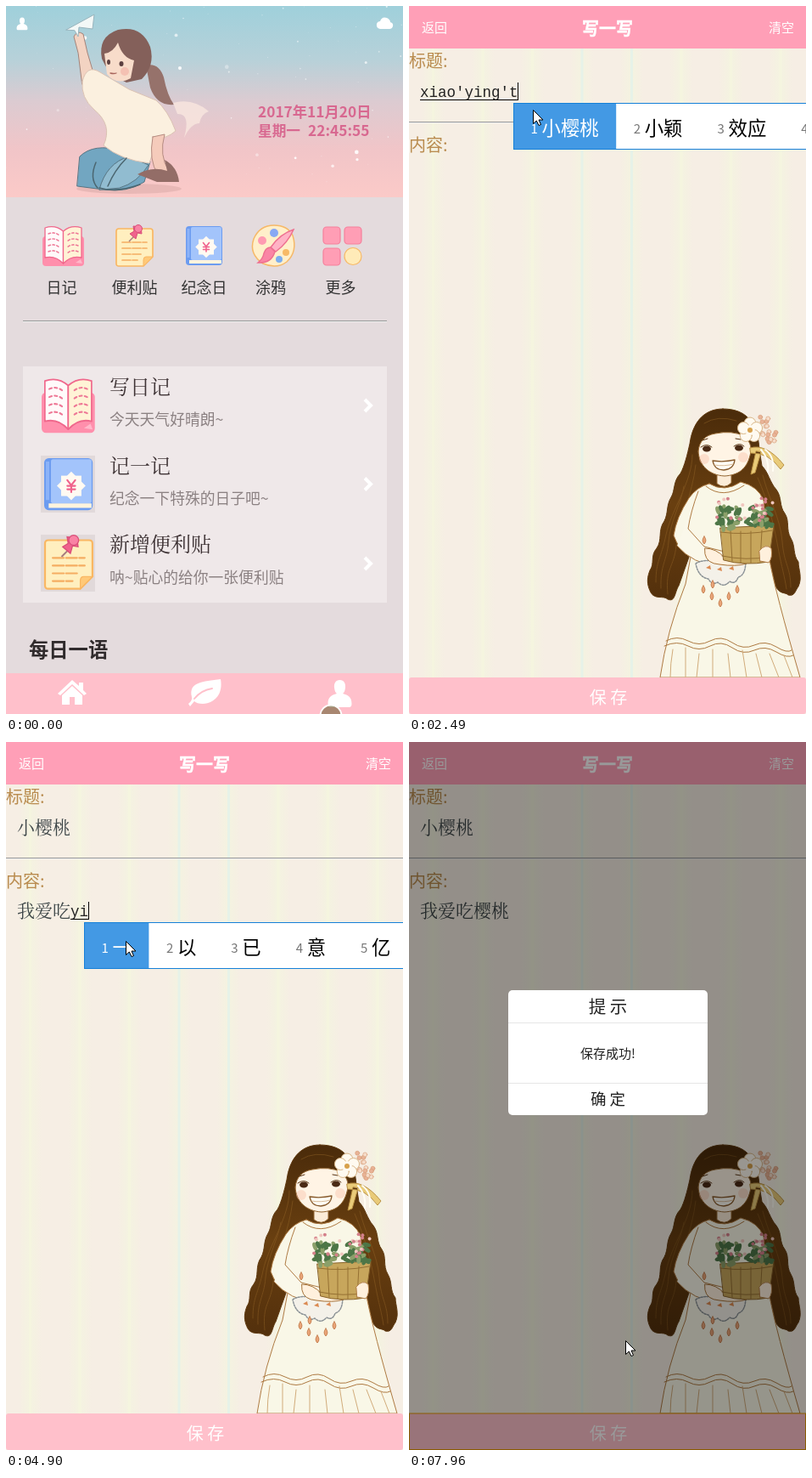
Write an HTML page that moves like this. It is 468 by 833 pixels and loops after 8 s.

```html
<!DOCTYPE html>
<html lang="zh-CN">
<head>
<meta charset="utf-8">
<title>写一写</title>
<style>
html, body { margin: 0; width: 100%; height: 100%; overflow: hidden; }
svg { display: block; width: 100vw; height: 100vh; }
text { font-family: "Noto Sans CJK SC", "Noto Sans", sans-serif; white-space: pre; }
.mid { text-anchor: middle; }
.serif { font-family: "Noto Serif CJK SC", "Noto Sans CJK SC", serif; }
.label { font-size: 18px; fill: #333; text-anchor: middle; }
.row { font-size: 24px; font-weight: 500; fill: #3f3436; }
.note { font-size: 17.8px; fill: #8b8182; }
.typed { font-size: 21px; font-weight: 300; fill: #3d4648; }
.pinyin { font: 17.5px "Liberation Mono", monospace; fill: #222; }
.line { fill: none; stroke-linecap: round; stroke-linejoin: round; }
</style>
</head>
<body>
<svg viewBox="0 0 468 833" preserveAspectRatio="none">
<defs>
  <linearGradient id="sky" x1="0" y1="0" x2="0" y2="1">
    <stop offset="0" stop-color="#9fd0db"/><stop offset=".28" stop-color="#b7d1d9"/>
    <stop offset=".5" stop-color="#dccbd1"/><stop offset=".75" stop-color="#f1c5c8"/>
    <stop offset="1" stop-color="#fbcac8"/>
  </linearGradient>
  <linearGradient id="hair" x1="0" y1="0" x2="0" y2="1">
    <stop offset="0" stop-color="#4a2b0a"/><stop offset=".5" stop-color="#693f10"/><stop offset="1" stop-color="#53300c"/>
  </linearGradient>
  <linearGradient id="stripe">
    <stop offset="0" stop-color="#f4f3e0" stop-opacity="0"/><stop offset=".5" stop-color="#f4f3e0"/>
    <stop offset="1" stop-color="#f4f3e0" stop-opacity="0"/>
  </linearGradient>
  <g id="diary">
    <rect y="13" width="49" height="35" rx="4" fill="#ff8fac"/>
    <g stroke="#f0688c" stroke-width="1.300" stroke-linejoin="round">
      <path d="M3 3Q15-1 24.500 7V45Q15 35 3 38Z" fill="#fffafa"/>
      <path d="M46 3Q34-1 24.500 7V45Q34 35 46 38Z" fill="#fff3d6"/>
    </g>
    <path class="line" d="M7 10Q14 7 20 12M7 17Q14 14 20 19M7 24Q14 21 20 26M7 31Q14 28 20 33M42 10Q35 7 29 12M42 17Q35 14 29 19M42 24Q35 21 29 26M42 31Q35 28 29 33" stroke="#ee7896" stroke-width="1.500" stroke-dasharray="2.500 2.500"/>
    <path d="M39 44l6-4 2 5z" fill="#ffb8ca"/>
  </g>
  <g id="memo">
    <path d="M3 5H40Q43 5 43 8V38L32 49H3Q0 49 0 46V8Q0 5 3 5Z" fill="#ffefbf" stroke="#f9b763" stroke-width="1.700"/>
    <path d="M43 38H35Q32 38 32 42V49Z" fill="#ffc978" stroke="#f9b763"/>
    <path class="line" d="M7 21H36M7 28H36M7 35H31M7 42H25" stroke="#f5ad62" stroke-width="1.700" stroke-dasharray="10 2"/>
    <path d="M22 13L15 20" stroke="#a67b7d" stroke-width="1.500"/>
    <path d="M20 2l9 1 1 8-5-1-2 7-7-6 5-3z" fill="#f0628c" stroke="#d94e79"/>
    <circle cx="26" cy="5" r="4.500" fill="#f982a4" stroke="#d94e79"/>
  </g>
  <g id="book">
    <rect width="43" height="46" rx="4" fill="#6c9cf0"/>
    <rect x="6" y="1" width="36" height="39" rx="2" fill="#a3c4fb"/>
    <path d="M4 40H42V44H4Z" fill="#fff4dd"/>
    <path d="M3 3V37" stroke="#8cb3f8" stroke-width="3"/>
    <g fill="#fffaf2"><rect x="15" y="15.500" width="18" height="18"/><rect x="15" y="15.500" width="18" height="18" transform="rotate(45 24 24.500)"/></g>
    <path class="line" d="M20.500 19.500L24 24L27.500 19.500M24 24V30M20.500 24.500H27.500M20.500 27.500H27.500" stroke="#f0628c" stroke-width="1.600"/>
  </g>
  <path id="user" d="M0-14C5-14 7-10 6.500-5C6-1 5 1 3.500 2C10 4 14 6 14 14Q14 18 11 18H-11Q-14 18-14 14C-14 6-10 4-3.500 2C-5 1-6-1-6.500-5C-7-10-5-14 0-14Z" fill="#fff"/>
</defs>

<g id="home">
  <rect width="468" height="833" fill="#e4dbdd"/>
  <rect width="468" height="225" fill="url(#sky)"/>
  <g id="sparks" fill="#fff"></g>
  <g stroke-linejoin="round" stroke-linecap="round">
    <ellipse cx="145" cy="215" rx="62" ry="6" fill="#d7a7a6" opacity=".5"/>
    <path d="M165 70Q180 66 186 84Q190 105 198 116Q178 118 170 96Z" fill="#96726b"/>
    <path d="M85 55L80 36Q84 28 91 33L96 55L104 82L90 92Z" fill="#f3d3c2" stroke="#a48379"/>
    <path d="M71 28L104 10L102 27L86 25L85 36L81 29Z" fill="#f3f8f7" stroke="#98b4bd"/>
    <path d="M113 62Q108 36 132 28Q160 22 170 48Q176 70 160 86L142 90Q124 82 117 70Z" fill="#84605a"/>
    <path d="M116 56Q126 55 132 43Q137 61 151 64L147 85Q130 94 119 80Z" fill="#f8dcca"/>
    <g fill="#5c4040"><ellipse cx="121" cy="66" rx="2" ry="3"/><ellipse cx="136" cy="68" rx="2.500" ry="3"/></g>
    <path d="M123 79q4 1 7 0" fill="none" stroke="#a8655c" stroke-width="1.300"/>
    <circle cx="140" cy="77" r="5" fill="#f2afa3" opacity=".6"/>
    <path d="M87 177Q103 161 136 170L170 183L163 207Q143 220 115 216L84 212Z" fill="#72a6c1" stroke="#577583"/>
    <path d="M110 216Q118 185 145 177L168 187Q155 208 134 214Z" fill="#91bcd0" stroke="#577583"/>
    <path d="M90 89Q95 68 111 78L145 98L177 111Q191 123 200 147Q188 157 179 154L169 185Q135 181 115 164Q126 140 104 122Q88 108 90 89Z" fill="#fbf0df" stroke="#dbc3b4"/>
    <path d="M173 154L187 151Q180 176 192 194L179 198Q168 182 173 154Z" fill="#f5cbbb" stroke="#b58b80"/>
    <path d="M155 198Q172 188 190 194L187 181Q202 189 204 207H178Z" fill="#936d67"/>
    <path d="M110 214Q130 220 158 210M106 184Q98 203 108 214M142 179Q128 193 120 212" fill="none" stroke="#4b6670" stroke-width="1.500"/>
    <path d="M197 114Q220 108 239 124Q230 127 228 138Q218 138 210 155Q218 126 202 127Z" fill="#f8e6df" opacity=".85"/>
  </g>
  <use href="#user" transform="translate(19 20) scale(.46)"/>
  <path d="M441 27Q436 26 437 21Q438 18 441 18Q443 12 449 14Q453 16 453 19Q457 20 456 24Q455 27 452 27Z" fill="#fff"/>
  <g font-size="17.300" font-weight="700" fill="#d86890">
    <text x="297" y="131">2017年11月20日</text>
    <text x="297" y="153" font-size="16.700">星期一</text>
    <text x="356" y="153" id="clock"></text>
  </g>
  <use href="#diary" x="43" y="258"/><use href="#memo" x="130" y="257"/><use href="#book" x="212" y="259"/>
  <g stroke-width="1.500">
    <path d="M338 270Q344 289 331 301Q319 310 303 303Q286 292 292 274Q299 258 316 258Q332 258 338 270Z" fill="#ffefca" stroke="#f6b968"/>
    <circle cx="302" cy="276" r="5" fill="#ff9bb2"/><circle cx="316" cy="267" r="5" fill="#88a8f4"/>
    <circle cx="330" cy="290" r="4" fill="#f7ba66"/><circle cx="322" cy="298" r="4" fill="#7cadee"/>
    <path d="M339 263Q332 279 318 289L312 284Q323 268 339 263Z" fill="#ffb2c5" stroke="#ee7090"/>
    <path d="M317 289Q313 303 297 302Q303 297 304 291Q306 284 312 284Z" fill="#fa85a5" stroke="#ee7090"/>
  </g>
  <g fill="#ff9eb5" stroke="#f5809c" stroke-width="1.200">
    <rect x="374" y="260" width="20" height="20" rx="4"/><rect x="399" y="260" width="20" height="20" rx="4"/>
    <rect x="374" y="285" width="20" height="20" rx="4"/>
    <circle cx="409" cy="294.500" r="10" fill="#ffebb8" stroke="#f7b967"/>
  </g>
  <text class="label" x="65.500" y="338">日记</text><text class="label" x="151.500" y="338">便利贴</text>
  <text class="label" x="233.500" y="338">纪念日</text><text class="label" x="312" y="338">涂鸦</text>
  <text class="label" x="394.500" y="338">更多</text>
  <path d="M20 370.500H449" stroke="#999"/><path d="M20 371.500H449" stroke="#eee"/>
  <rect x="20" y="424" width="429" height="278" fill="#efe8e9"/>
  <path d="M41 529h64v67h-64zM41 622h64v67h-64z" fill="#e1d9da"/>
  <use href="#diary" transform="translate(42 437) scale(1.280 1.360)"/>
  <use href="#book" transform="translate(45 532) scale(1.330)"/>
  <use href="#memo" transform="translate(46 622) scale(1.300)"/>
  <text class="row serif" x="122" y="457">写日记</text><text class="note" x="122" y="493">今天天气好晴朗~</text>
  <text class="row serif" x="122" y="550">记一记</text><text class="note" x="122" y="586">纪念一下特殊的日子吧~</text>
  <text class="row serif" x="122" y="642">新增便利贴</text><text class="note" x="122" y="679">呐~贴心的给你一张便利贴</text>
  <path d="M423 463l7 7-7 7M423 555.500l7 7-7 7M423 649l7 7-7 7" fill="none" stroke="#fff" stroke-width="4"/>
  <text x="27" y="766" font-size="23.300" font-weight="700" fill="#302b2c">每日一语</text>
  <rect y="785" width="468" height="48" fill="#ffc0cb"/>
  <path d="M61 809L78 793L86 800V796H91V805L95 809L92 811L78 798L64 811ZM66 811L78 800L90 811V822H81V813H75V822H66Z" fill="#fff"/>
  <path d="M215 821Q220 817 219 813C215 795 232 795 253 792C256 809 247 820 232 821Q225 821 222 818L217 824Z" fill="#fff"/>
  <path class="line" d="M222 815Q230 805 243 803" stroke="#ffc0cb" stroke-width="2"/>
  <use href="#user" x="393.500" y="807"/>
</g>

<g id="editor">
  <rect width="468" height="833" fill="#f6eee4"/>
  <g id="stripes"></g>
  <g id="girl" stroke-linejoin="round" stroke-linecap="round">
    <path d="M370 474C346 474 334 492 331 515C328 528 325 541 320 550C311 559 314 570 309 578C303 588 306 596 301 606C293 617 299 628 292 638C284 647 290 656 284 664C279 676 282 684 285 690C290 699 300 693 305 698C314 702 313 690 318 682L333 640L350 570H395L420 600L425 650L432 682C437 693 443 689 447 693C455 695 455 688 459 683C464 672 459 663 459 654C452 645 456 636 450 626C444 616 449 606 443 597C436 588 440 578 433 569C425 560 424 549 416 541L413 522C411 490 398 474 370 474Z" fill="url(#hair)" stroke="#5f390f"/>
    <g fill="none" stroke="#956629" opacity=".45">
      <path d="M334 528C334 560 309 593 303 622S291 652 291 678"/><path d="M338 540C334 575 318 608 315 635S302 660 305 692"/>
      <path d="M324 565C321 585 308 606 306 630S296 657 297 685"/><path d="M417 552C424 580 438 603 440 630S450 660 450 684"/>
      <path d="M411 555C424 585 430 610 435 637S442 667 445 686"/><path d="M348 491Q364 481 386 488"/>
    </g>
    <path d="M363 545V562Q372 569 380 561V545Z" fill="#fbecd8" stroke="#92642f"/>
    <path d="M341 524C342 512 349 505 361 503Q381 499 395 506C404 514 404 521 402 529C398 545 388 552 372 553C354 552 342 541 341 524Z" fill="#fff4e5" stroke="#92642f"/>
    <g fill="#f7b69c" opacity=".35"><circle cx="348" cy="533" r="6"/><circle cx="394" cy="531" r="6"/></g>
    <g fill="#4a2a15"><ellipse cx="351" cy="521" rx="5" ry="3.500"/><ellipse cx="389" cy="520" rx="5" ry="3.500"/></g>
    <path d="M344 519q7-5 13 0M383 518q7-5 12 0M346 511l6-2M385 509l6 1" fill="none" stroke="#563313"/>
    <path d="M358 535Q371 537 384 534Q383 545 371 546Q360 546 358 535Z" fill="#fffdf5" stroke="#86592a" stroke-width="1.300"/>
    <path d="M360 540Q372 542 382 539" fill="none" stroke="#c99f72" stroke-width=".7"/>
    <g stroke="#ae7a42">
      <path d="M354 562Q372 573 391 560Q412 565 418 582L425 652Q432 690 461 790H296Q304 735 326 680L332 648Q318 640 312 623Q315 602 330 579Q339 566 354 562Z" fill="#f9f7e7"/>
      <path d="M341 571Q332 595 329 615L348 636L372 642L365 659Q335 657 316 635" fill="#faf8ea"/>
      <path d="M350 565Q370 581 395 564M303 747Q316 740 329 747T355 747T381 749T407 752T433 754T451 758M301 753Q316 746 329 753T355 753T381 755T407 758T433 760T453 764" fill="none"/>
      <path d="M311 757Q308 774 308 790M326 755V790M342 762L339 790M358 757V790M376 762L379 790M393 758L398 790M409 762L416 790M425 762L436 790M442 764L452 790" fill="none" stroke="#d1ab7a"/>
    </g>
    <path d="M338 656Q347 650 366 654L397 652Q397 670 388 672Q385 681 378 677Q371 685 364 678Q357 682 353 674Q341 672 338 656Z" fill="#f4f1e9" stroke="#8b9296" stroke-width="1.500" stroke-dasharray="2 1.500"/>
    <g fill="#db8a52"><path d="M350 661l5-3 1 5zM363 663l5-3 1 5zM377 662l5-3 1 5z"/></g>
    <g id="drops" fill="#eaa579" stroke="#bd7341" stroke-width=".8"></g>
    <path d="M349 638Q362 638 372 649L398 656Q385 660 366 657Q351 656 349 645Z" fill="#fff0dd" stroke="#a67239"/>
    <path d="M367 614L430 611L424 654Q395 659 371 652Z" fill="#c7a65c" stroke="#87622b"/>
    <path d="M367 619Q398 623 428 617M369 647Q397 653 425 648M379 617L381 653M391 618V655M403 618V655M416 617L414 654" fill="none" stroke="#957032"/>
    <path d="M413 641Q420 632 427 638Q429 649 424 655L414 653Z" fill="#fff0dd" stroke="#b17e49"/>
    <g id="bouquet"></g>
    <path d="M402 520Q421 514 442 540L438 545Q424 525 403 526ZM409 524L403 551L408 549L415 525Z" fill="#e9cb79" stroke="#ba9144"/>
    <path d="M420 522Q431 530 429 547M415 522Q425 533 423 548" fill="none" stroke="#fffdf3" stroke-width="2"/>
    <g id="bloom"></g>
  </g>
  <rect width="468" height="50" fill="#ff9fb7"/>
  <g fill="#fff"><text x="15" y="31" font-size="15">返回</text><text x="424" y="31" font-size="15">清空</text>
    <text class="mid" x="234" y="33.500" font-size="20" font-weight="900" stroke="#fff" stroke-width=".4">写一写</text></g>
  <g fill="#b98b4e" font-size="20"><text y="72">标题:</text><text y="171">内容:</text></g>
  <path d="M0 136.500H468" stroke="#9a9a9a"/><path d="M0 137.500H468" stroke="#eee"/>
  <g id="title"></g><g id="content"></g>
  <rect y="790" width="468" height="43" rx="3" fill="#ffc0cb"/>
  <text class="mid" x="235" y="820.500" font-size="20" fill="#fff">保 存</text>
</g>

<g id="dialog">
  <rect x=".5" y="790" width="467" height="42.500" fill="none" stroke="#e59700"/>
  <rect width="468" height="833" opacity=".4"/>
  <rect x="117" y="292" width="235" height="147" rx="5" fill="#fff"/>
  <path d="M117 330.500H352M117 401.500H352" stroke="#e6e6e6"/>
  <g class="mid" fill="#222"><text x="234.500" y="318.500" font-size="20.500">提 示</text>
    <text x="234.500" y="372" font-size="15">保存成功!</text><text x="234.500" y="427" font-size="18.500">确 定</text></g>
</g>
<circle id="touch" r="12.500" fill="#605828" fill-opacity=".55" stroke="#fff" stroke-width="2"/>
<path id="arrow" d="M.5.5V16.500L4.300 13L7 18.500L9.500 17.500L7 12H12Z" fill="#fff" stroke="#000"/>
</svg>
<script>
const LOOP = 8000, $ = id => document.getElementById(id);
let seed = 7;
const rand = () => (seed = seed * 16807 % 2147483647) / 2147483647;
const repeat = (n, draw) => Array.from({ length: n }, (_, i) => draw(i)).join('');
const dot = (x, y, r, extra = '') => `<circle cx="${x}" cy="${y}" r="${r}" ${extra}/>`;

// Scenery made of many small parts
$('sparks').innerHTML = repeat(70, () => dot(rand() * 468, rand() ** 1.5 * 215, .4 + rand() ** 4 * 2, `opacity="${.3 + rand() * .6}"`));
$('stripes').innerHTML = repeat(8, i => {
  const x = 28.5 + i * 58.5, strong = i === 3 || i === 4;
  return `<rect x="${x - 14}" y="50" width="28" height="740" fill="url(#stripe)"/>` +
    `<rect x="${x - 1.5}" y="50" width="3" height="740" fill="${strong ? '#e6f2e8' : '#f5f5df'}"/>`;
});
const drop = (x, y) => `<path d="M${x} ${y}q4 5 0 9q-4-4 0-9z"/>`;
$('drops').innerHTML = drop(348, 624) + repeat(5, i => drop(347 + i * 10, 698 - Math.abs(i - 2) * 8)) + drop(358, 676);
$('bouquet').innerHTML = repeat(48, i => {
  const x = 364 + rand() * 64, y = 590 + rand() * 26;
  return `<ellipse cx="${x}" cy="${y}" rx="5" ry="2.5" fill="${i % 3 ? '#4d7647' : '#8ba06a'}" transform="rotate(${rand() * 180} ${x} ${y})"/>`;
}) + repeat(26, i => dot(363 + rand() * 66, 579 + rand() * 27, 2, `fill="${i % 3 ? '#d4808a' : '#f0c6be'}"`));
$('bloom').innerHTML =
  repeat(18, i => dot(409 + rand() * 25, 479 + rand() * 40, 2.5, `fill="${i % 2 ? '#e9b397' : '#f6dcc9'}" stroke="#d69a74" stroke-width=".6"`)) +
  repeat(5, i => dot(402 + 8 * Math.sin(i * 1.257), 499 - 8 * Math.cos(i * 1.257), 7, 'fill="#fffaf0" stroke="#d8b586"')) +
  dot(402, 499, 6, 'fill="#fffaf0"') + dot(402, 499, 3, 'fill="#d7a14b"');

// Pointer: [time, x, y, shape]
const pointer = [
  [0, 383, 835], [90, 345, 745], [165, 270, 610], [240, 185, 520], [315, 135, 480],
  [390, 224, 481], [710, 137, 454], [860, 139, 468]
];
function glide(start, end, steps, from, bend, to) {
  for (let i = 1; i <= steps; i++) {
    const k = i / steps, mix = a => (1 - k) ** 2 * from[a] + 2 * k * (1 - k) * bend[a] + k * k * to[a];
    pointer.push([start + (end - start) * (i - 1) / (steps - 1), mix(0), mix(1)]);
  }
}
glide(940, 1260, 5, [139, 468], [136, 210], [133, 123]);
pointer.push([1570, 148, 120, 'arrow'], [1720, 146, 122, 'arrow'],
  [2760, 100, 165], [2830, 59, 215], [2900, 142, 238], [3290, 141, 234, 'arrow']);
glide(6400, 7102, 10, [142, 238], [442, 560], [250, 780]);
pointer.push([7180, 240, 812, 'arrow'], [7880, 248, 758, 'arrow'], [7960, 255, 704, 'arrow']);

// Fields: [time, committed text, pinyin, candidates]
const title = [
  [0, ''], [2100, '', 'x', '小 想 下 行 些 新'],
  [2490, '', "xiao'ying't", '小樱桃 小颖 效应 小英'], [2590, '小樱桃']
];
const content = [
  [0, ''], [3690, '我'],
  [3920, '我', 'a', '啊 爱 按 阿 安 吖'], [4000, '我', 'ai', '爱 哎 唉 挨 矮 艾'],
  [4160, '我', "ai'c", '爱吃 爱才 哎 爱 唉'], [4310, '我', "ai'chi", '爱吃 哎 爱 唉 欸'],
  [4520, '我爱吃'], [4820, '我爱吃', 'y', '有 也 一 要 样'], [4900, '我爱吃', 'yi', '一 以 已 意 亿'],
  [5280, '我爱吃', 'yin', '因 音 引 银'], [5365, '我爱吃', "ying't", '樱桃 英坛 应'],
  [5450, '我爱吃', "ying'tao", '樱桃 应 英 影'], [5770, '我爱吃樱桃']
];
const caretTimes = {
  title: [[1410, 1950], [2100, 2830]],
  content: [[3130, 3520], [3690, 6000], [6400, 6800], [7180, 7330]]
};
const latest = (list, t) => list.findLast(entry => entry[0] <= t);

function candidateBar(left, top, words) {
  let x = left;
  const items = words.split(' ').map((word, i) => {
    const width = 54 + 22.4 * word.length, at = x;
    x += width;
    return (i ? '' : `<rect x="${at}" y="${top}" width="${width}" height="54" fill="#4399e4"/>`) +
      `<text x="${at + 20.5}" y="${top + 36}" font-size="15" fill="${i ? '#777' : '#fff'}">${i + 1}</text>` +
      `<text x="${at + 33.5}" y="${top + 38}" font-size="22.4" fill="${i ? '#000' : '#fff'}">${word}</text>`;
  });
  return `<rect x="${left}" y="${top}" width="600" height="54" fill="#fff"/>${items.join('')}` +
    `<rect x="${left + .5}" y="${top + .5}" width="600" height="54" fill="none" stroke="#1580d8"/>`;
}

function drawField(id, list, top, t) {
  const [, done, pinyin = '', words] = latest(list, t);
  const start = 13 + 21 * done.length, end = start + 10.5 * pinyin.length;
  const blink = caretTimes[id].some(([on, off]) => t >= on && t < off);
  const key = done + pinyin + blink, node = $(id);
  if (node.dataset.key === key) return;
  node.dataset.key = key;
  node.innerHTML = `<text class="typed serif" x="13" y="${top + 18}">${done}</text>` +
    (pinyin && `<text class="pinyin" x="${start}" y="${top + 17}">${pinyin}</text>` +
      `<path d="M${start} ${top + 20.5}H${end}" stroke="#000"/>` + candidateBar(Math.floor(end - 5), top + 24, words)) +
    (blink ? `<rect x="${Math.floor(end)}" y="${top}" width="1" height="21"/>` : '');
}

const show = (id, on) => $(id).style.display = on ? '' : 'none';

function render(now) {
  const t = now % LOOP;
  show('home', t < 860);
  show('editor', t >= 860);
  show('dialog', t >= 7480);
  $('clock').textContent = '22:45:' + (t < 240 ? 55 : 56);
  drawField('title', title, 90, t);
  drawField('content', content, 188, t);
  const [, x, y, shape = 'touch'] = latest(pointer, t);
  for (const id of ['touch', 'arrow']) {
    show(id, id === shape);
    $(id).setAttribute('transform', `translate(${x} ${y})`);
  }
}
const began = performance.now();
function tick() {
  render(performance.now() - began);
  requestAnimationFrame(tick);
}
tick();
</script>
</body>
</html>
```
